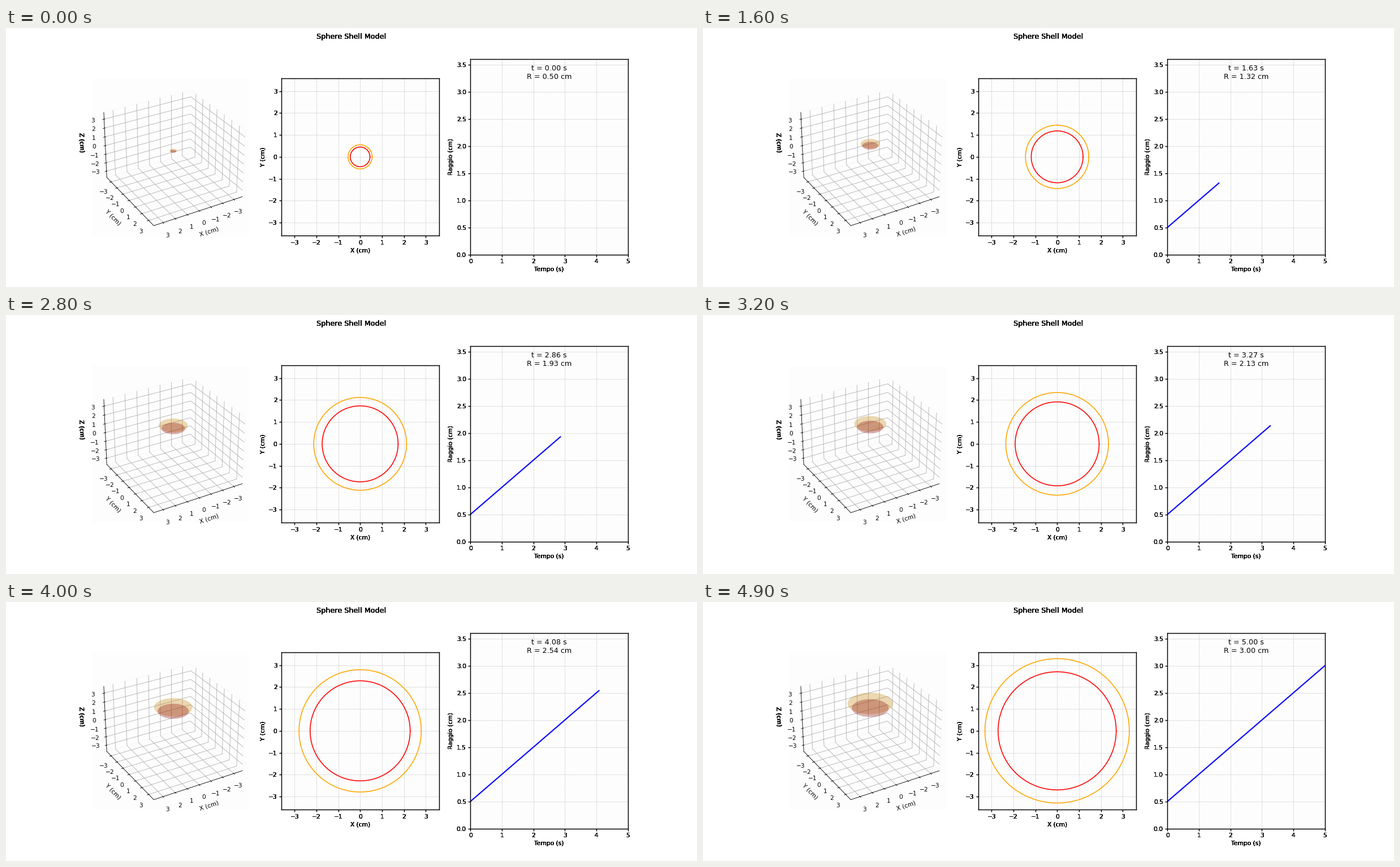
These frames come from a looping animation (1222 px wide and 458 px high, 5000 ms). A matplotlib script:

```python
import numpy as np
import matplotlib.pyplot as plt
from matplotlib.animation import FuncAnimation
from mpl_toolkits.mplot3d.art3d import Poly3DCollection

DPI = 76.375
FRAMES = 50
LIMIT = 3.6
PAPER = "#fdfdfd"
PASSES = 5

times = np.linspace(0, 5, FRAMES)
radii = 0.5 + 0.5 * times
angle = np.linspace(0, 2 * np.pi, 100)
ring = np.column_stack([np.cos(angle), np.sin(angle)])


def harden(text):
    """Draw a text several times over so that its soft edges turn solid."""
    draw = text.draw

    def draw_repeated(renderer):
        for _ in range(PASSES):
            draw(renderer)

    text.draw = draw_repeated


def style_plot(ax, xlabel, ylabel):
    ax.set_facecolor(PAPER)
    ax.set_xlabel(xlabel)
    ax.set_ylabel(ylabel)
    ax.grid(True, linestyle="--", linewidth=0.5)
    ax.tick_params(width=1.4)
    ax.spines[:].set_linewidth(1.4)
    for axis in (ax.xaxis, ax.yaxis):
        harden(axis.label)
        for label in axis.get_ticklabels():
            harden(label)


def cap(radius):
    """Rim of the 30 degree cap of a sphere."""
    rim = radius * np.sin(np.pi / 6) * ring[:-1]
    height = np.full(len(rim), radius * np.cos(np.pi / 6))
    return [np.column_stack([rim, height])]


plt.rcParams.update({"font.family": "DejaVu Sans", "font.size": 10,
                     "figure.subplot.bottom": 0.125})
fig = plt.figure(figsize=(16, 5.997), dpi=DPI, facecolor="white")
harden(fig.suptitle("Sphere Shell Model"))

# Perspective view
space = fig.add_subplot(131, projection="3d", computed_zorder=False)
space.set_facecolor(PAPER)
space.view_init(elev=30, azim=60)
edge = LIMIT * 25 / 24
space.set(xlim=(-edge, edge), ylim=(-edge, edge), zlim=(-edge, edge),
          xlabel="X (cm)", ylabel="Y (cm)", zlabel="Z (cm)")
for axis in (space.xaxis, space.yaxis, space.zaxis):
    axis.set_ticks(range(-3, 4))
    axis.pane.set_fill(False)
    axis.pane.set_edgecolor("#f5f5f5")
harden(space.zaxis.label)

outer_cap = Poly3DCollection(cap(0.55), facecolors=[(0.77, 0.5, 0, 0.3)],
                             edgecolors="none", zorder=3)
inner_cap = Poly3DCollection(cap(0.45), facecolors=[(0.54, 0, 0, 0.3)],
                             edgecolors="none", zorder=4)
space.add_collection3d(outer_cap)
space.add_collection3d(inner_cap)

# Cross section
section = fig.add_subplot(132, aspect="equal")
section.set(xlim=(-LIMIT, LIMIT), ylim=(-LIMIT, LIMIT),
            xticks=range(-3, 4), yticks=range(-3, 4))
style_plot(section, "X (cm)", "Y (cm)")
inner_ring, = section.plot([], [], color="red", linewidth=1.5)
outer_ring, = section.plot([], [], color="orange", linewidth=1.5)

# Radius over time
chart = fig.add_subplot(133)
chart.set(xlim=(0, 5), ylim=(0, LIMIT),
          xticks=range(6), yticks=np.arange(0, 3.6, 0.5))
style_plot(chart, "Tempo (s)", "Raggio (cm)")
curve, = chart.plot([], [], color="blue", linewidth=2)
readout = chart.text(0.5, 0.9, "", transform=chart.transAxes,
                     ha="center", fontsize=12)


def update(i):
    t, r = times[i], radii[i]
    outer, inner = 1.1 * r, 0.9 * r
    outer_cap.set_verts(cap(outer))
    inner_cap.set_verts(cap(inner))
    outer_ring.set_data(*(outer * ring).T)
    inner_ring.set_data(*(inner * ring).T)
    curve.set_data(times[:i + 1], radii[:i + 1])
    readout.set_text(f"t = {t:.2f} s\nR = {r:.2f} cm")
    return outer_cap, inner_cap, outer_ring, inner_ring, curve, readout


anim = FuncAnimation(fig, update, frames=FRAMES, interval=100,
                     repeat=True, repeat_delay=0, blit=False)
plt.show()
```
